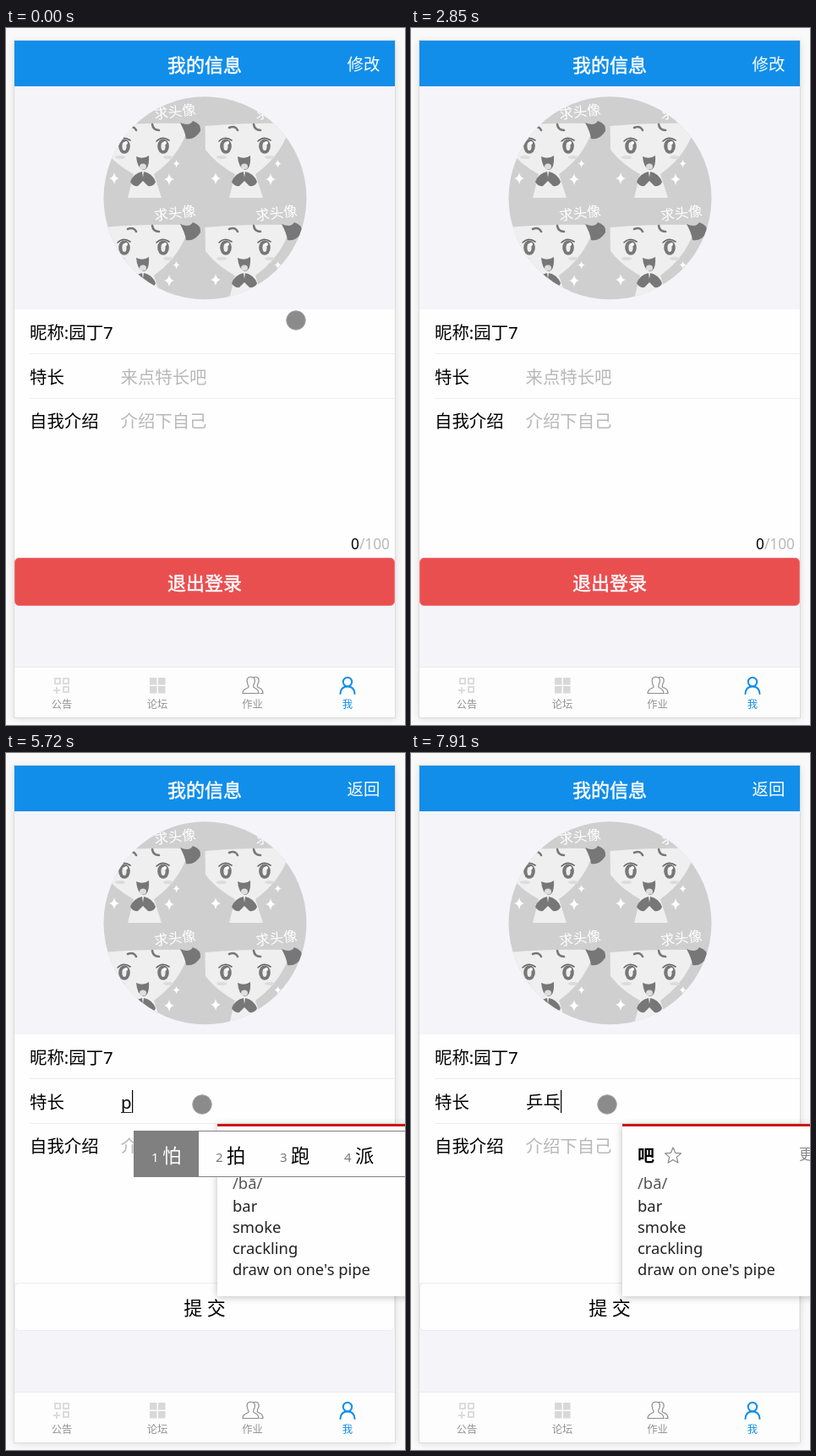
An HTML page for the animation above (8000 ms loop, 472 px wide and 825 px high).

```html
<!DOCTYPE html>
<html lang="zh-CN">
<head>
<meta charset="utf-8">
<style>
  html, body { margin: 0; width: 100%; height: 100%; overflow: hidden; background: #f8f8f8; }
  svg { display: block; width: 472px; height: 825px; }
  text { font-family: "Noto Sans", "Noto Sans CJK SC", sans-serif; white-space: pre; }
  .row { font-size: 20.4px; }
  .title { font-size: 22px; text-anchor: middle; }
  .strong { fill: #fff; stroke: #fff; stroke-width: .5; }
  .hint { fill: #b8b8b8; }
  .tab { font-size: 12.3px; text-anchor: middle; fill: #929292; }
  .dict { font-size: 18.4px; fill: #222; }
  .line { fill: none; stroke-linecap: round; stroke-linejoin: round; }
</style>
</head>
<body>
<svg viewBox="0 0 472 825">
  <defs>
    <filter id="soft" x="-20%" y="-20%" width="140%" height="140%"><feGaussianBlur stdDeviation="5"/></filter>
    <clipPath id="round"><circle cx="235.5" cy="201.3" r="120"/></clipPath>
    <g id="tile">
      <path d="M115.500 116Q160 112 209 113Q216 117 214 123Q203 153 175 173L184 201H144L151 173Q130 162 116 144Z" fill="#efefef"/>
      <path d="M206 112Q217 117 221 110Q231 113 230 122Q223 133 213 131Q212 123 206 112Z" fill="#777"/>
      <path class="line" d="M144 118Q151 115 154 121M173 114Q174 121 181 121" stroke="#777" stroke-width="2.6"/>
      <g id="eye">
        <ellipse cx="140" cy="140" rx="6.8" ry="8.8" fill="#777"/>
        <ellipse cx="140" cy="140" rx="2.6" ry="5" fill="#eee"/>
        <circle cx="142" cy="136" r="2" fill="#fff"/>
        <path class="line" d="M132 134Q139 127 147 133" stroke="#666" stroke-width="1.6"/>
      </g>
      <use href="#eye" x="46"/>
      <g fill="#dcdcdc"><ellipse cx="135" cy="153" rx="6" ry="2"/><ellipse cx="192" cy="153" rx="6" ry="2"/></g>
      <path d="M154 152Q162 156 169 151Q170 168 162 168Q155 165 154 152Z" fill="#777"/>
      <ellipse cx="162" cy="164" rx="4" ry="3.6" fill="#ddd"/>
      <path d="M161 170Q151 172 147 182Q150 188 156 187L162 181L168 187Q175 188 177 182Q173 172 163 170L162 177Z" fill="#777"/>
      <g fill="#fff">
        <path id="spark" d="M128 171Q129 177 134 178Q129 179 128 185Q127 179 122 178Q127 177 128 171Z"/>
        <use href="#spark" x="65" y="1"/>
        <use href="#spark" transform="translate(112 36) scale(.7)"/>
        <text x="175" y="105" font-size="16.500" transform="rotate(-7 200 98)">求头像</text>
      </g>
    </g>
  </defs>

  <rect width="472" height="825" fill="#f9f9f9"/>
  <rect x="10" y="17" width="450" height="800" fill="#000" opacity=".13" filter="url(#soft)"/>
  <rect x="9.5" y="14.5" width="451" height="802" fill="#f4f4f9" stroke="#dcdcdc"/>
  <rect x="10" y="15" width="450" height="54" fill="#118eea"/>
  <text class="title strong" x="235" y="51.5">我的信息</text>
  <text id="action" x="403.5" y="50" font-size="19.4" fill="#fff"></text>

  <g clip-path="url(#round)">
    <rect x="115" y="81" width="241" height="241" fill="#cfcfcf"/>
    <use href="#tile"/><use href="#tile" x="120"/>
    <use href="#tile" y="120"/><use href="#tile" x="120" y="120"/>
  </g>

  <rect x="10" y="333" width="450" height="294" fill="#fefefe"/>
  <path d="M28 385.5H460M28 438.5H460" stroke="#ececec"/>
  <g class="row">
    <text x="28" y="367.5">昵称:园丁7</text>
    <text x="28" y="420.5">特长</text>
    <text x="28" y="472.5">自我介绍</text>
    <text id="hint" class="hint" x="135.5" y="420.5">来点特长吧</text>
    <text class="hint" x="135.5" y="473">介绍下自己</text>
    <text id="typed" x="136" y="420.5"></text>
  </g>
  <path id="underline" stroke="#222"/>
  <rect id="caret" y="399" width="1.2" height="27" fill="#000"/>
  <text x="454" y="616.5" font-size="17.3" text-anchor="end">0<tspan class="hint">/100</tspan></text>

  <rect id="button" x="10.5" y="627.5" width="449" height="56" rx="5"/>
  <text id="label" class="title" x="235" y="665"></text>

  <rect x="10" y="757" width="450" height="59" fill="#fdfdfd"/>
  <path d="M10 756.5H460" stroke="#ececec"/>
  <path d="M58 770h6v6h-6zM68 770h6v6h-6zM68 780h6v6h-6zM56 784h8M60 780v8" fill="none" stroke="#dcdcdc" stroke-width="2"/>
  <path d="M170 769h8.5v8.5h-8.5zM180 769h8.5v8.5h-8.5zM170 779h8.5v8.5h-8.5zM180 779h8.5v8.5h-8.5z" fill="#d8d8d8"/>
  <g class="line" stroke="#8c8c8c" stroke-width="1.2">
    <path d="M280 787.5Q280 783 286 781Q288 780 286 777Q283 769 289 768Q296 768 294 775Q292 779 293 780.5Q299 783 299 787.5Z"/>
    <path d="M293 768.5Q300 767 299 774Q296 779 298 780.5Q304 782 304 787.5H301"/>
  </g>
  <g class="line" stroke="#118eea" stroke-width="2">
    <circle cx="404" cy="774" r="5.2"/><path d="M395.5 788Q396 779.5 404 779.5Q412 779.5 412.5 788"/>
  </g>
  <text class="tab" x="66" y="804.5">公告</text>
  <text class="tab" x="179" y="804.5">论坛</text>
  <text class="tab" x="291.5" y="804.5">作业</text>
  <text class="tab" x="404" y="804.5" style="fill:#118eea">我</text>

  <g id="dict">
    <rect x="250" y="441" width="240" height="203" fill="#000" opacity=".25" filter="url(#soft)"/>
    <rect x="250" y="439" width="240" height="204" fill="#fefefe"/>
    <rect x="250" y="439" width="240" height="3" fill="#cb1414"/>
    <text x="268" y="484" font-size="20" font-weight="700">吧</text>
    <path d="M310 467l2.7 6.3 6.8.6-5.2 4.5 1.6 6.6-5.9-3.5-5.9 3.5 1.6-6.6-5.2-4.5 6.8-.6z" class="line" stroke="#888" stroke-width="1.2"/>
    <text x="459" y="481" font-size="17" fill="#888">更多</text>
    <g class="dict">
      <text x="268" y="516" fill="#555">/bā/</text>
      <text x="268" y="542.5">bar</text>
      <text x="268" y="567.5">smoke</text>
      <text x="268" y="592.5">crackling</text>
      <text x="268" y="617.5">draw on one's pipe</text>
    </g>
  </g>
  <g id="ime"></g>
  <circle id="pointer" r="11.3" fill="#8b8b8b" stroke="#a8a8a8"/>
</svg>
<script>
const LOOP = 8000, STEP = 110;
const $ = id => document.getElementById(id);
const set = (el, attrs) => { for (const k in attrs) el.setAttribute(k, attrs[k]); };
const show = (el, on) => set(el, { visibility: on ? 'visible' : 'hidden' });

// time, x, y
const path = [
  [0, 343, 346], [100, 341, 400], [210, 332, 475], [320, 308, 500], [430, 247, 503],
  [540, 150, 495], [650, 140, 470], [760, 158, 425], [870, 185, 378], [1200, 185, 389],
  [1750, 208, 461], [2080, 203, 432], [2300, 214, 420], [2630, 223, 451], [2740, 227, 463],
  [3070, 250, 425], [3400, 423, 47], [3510, 423, 47], [3730, 275, 345], [3840, 248, 375],
  [3950, 239, 402], [4280, 232, 416]
];

// time, text, candidates
const typing = [
  [5720, 'p', '怕 拍 跑 派'],
  [6040, 'pi', '皮 批 匹 屁'],
  [6260, 'pin', '拼 品 频 贫'],
  [6490, 'ping', '评判 乒乓 平平'],
  [6810, "ping'p", '评判 乒乓 平平'],
  [7030, "ping'pa", '乒乓 平爬 评判'],
  [7150, "ping'pan", '评判 平盘 乒乓'],
  [7360, "ping'pang", '乒乓 平旁 乒'],
  [7810, '乒乓', '']
];

const between = (t, a, b) => t >= a && t < b;

function pointerAt(t) {
  const q = Math.max(0, 100 + STEP * Math.floor((t - 90) / STEP));
  const i = path.findIndex(p => p[0] > q);
  if (i < 0) return path[path.length - 1].slice(1);
  const [a, b] = [path[i - 1], path[i]];
  const f = (q - a[0]) / (b[0] - a[0]);
  return [1, 2].map(k => a[k] + (b[k] - a[k]) * f);
}

function imeBar(x, words, tall) {
  const bottom = tall ? 535 : 502;
  let out = `<rect x="${x}" y="447" width="400" height="${bottom - 447}" fill="#fefefe"/>
    <path d="M${x} 447.5H472M${x} ${bottom - .5}H472" stroke="#808080"/>`;
  let left = x;
  words.forEach((word, i) => {
    const width = 54 + 22 * word.length;
    if (!i) out += `<rect x="${x}" y="447" width="${width + 1}" height="55" fill="#808080"/>`;
    out += `<text x="${left + 21}" y="484" font-size="15" fill="${i ? '#777' : '#fff'}">${i + 1}</text>
      <text x="${left + 34}" y="485" font-size="22.3" fill="${i ? '#000' : '#fff'}">${word}</text>`;
    left += width;
  });
  return out;
}

let lastBar = '';
function draw(t) {
  const editing = t >= 3510;
  $('action').textContent = editing ? '返回' : '修改';
  $('label').textContent = editing ? '提 交' : '退出登录';
  set($('label'), { class: editing ? 'title' : 'title strong' });
  set($('button'), editing
    ? { fill: '#fefefe', stroke: '#ececf0' }
    : { fill: '#ea4f50', stroke: '#ee7172' });

  const [, text, list] = typing.filter(k => t >= k[0]).pop() || [0, '', ''];
  $('typed').textContent = text;
  show($('hint'), !text);
  const end = 136 + (text ? $('typed').getComputedTextLength() : 0);
  set($('caret'), { x: Math.round(end) });
  show($('caret'), between(t, 4300, 4860) || t >= 5290);
  set($('underline'), { d: list ? `M136 425.5H${end}` : '' });

  const tall = between(t, 6490, 6700) || between(t, 7150, 7360);
  const bar = list ? imeBar(Math.round(end) + 2, list.split(' '), tall) : '';
  if (bar !== lastBar) $('ime').innerHTML = lastBar = bar;

  set($('dict'), { opacity: t < 4860 ? 0 : t < 4960 ? .5 : 1 });

  const [x, y] = pointerAt(t);
  set($('pointer'), { cx: x, cy: y });
  show($('pointer'), !between(t, 2850, 3070));
}

const start = performance.now();
function tick() {
  draw((performance.now() - start) % LOOP);
  requestAnimationFrame(tick);
}
tick();
</script>
</body>
</html>
```
